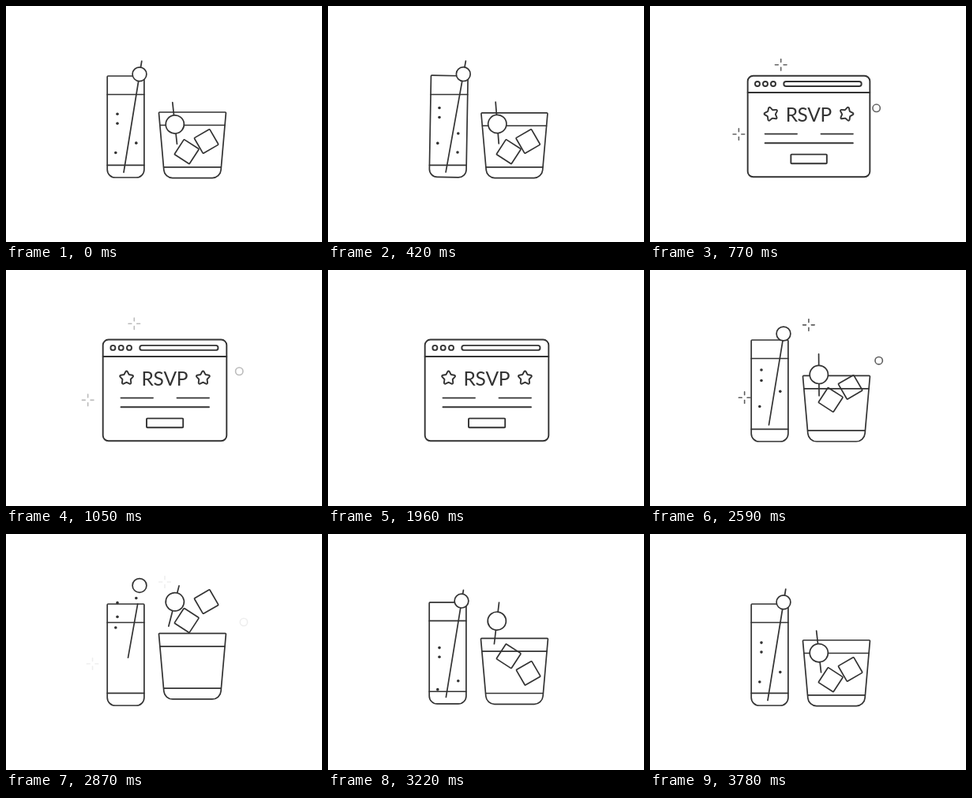
These frames come from a looping animation (400 by 300 pixels, 3.85 s). An HTML page with a canvas:

```html
<!DOCTYPE html>
<html>
<head>
<meta charset="utf-8">
<style>
html, body { margin: 0; width: 100%; height: 100%; overflow: hidden; background: #fff; }
canvas { display: block; width: 400px; height: 300px; }
</style>
</head>
<body>
<canvas></canvas>
<script>
const LOOP = 3850, STEP = 70, INK = '#333';
const OPEN = 630, STRETCH = 1960, POP = 2520, PEAK = 2940;
const canvas = document.querySelector('canvas');
const ctx = canvas.getContext('2d');
const ratio = window.devicePixelRatio || 1;
canvas.width = 400 * ratio;
canvas.height = 300 * ratio;

const mix = (a, b, u) => a + (b - a) * u;
const progress = (t, from, to) => Math.min(1, Math.max(0, (t - from) / (to - from)));

// Falls from 1 to 0, passes it once and comes to rest.
const settle = u => Math.exp(-(u ** 3)) * Math.cos(u * Math.PI / 2);
// Leaves 0 at POP, reaches 1 at PEAK, then drops back.
const toss = (t, fallTime) => t < PEAK
  ? Math.sin(progress(t, POP, PEAK) * Math.PI / 2)
  : settle((t - PEAK) / fallTime);
const hop = (t, from, to) => Math.sin(progress(t, from, to) * Math.PI) ** 2;

function line(x1, y1, x2, y2) {
  ctx.beginPath();
  ctx.moveTo(x1, y1);
  ctx.lineTo(x2, y2);
  ctx.stroke();
}

function circle(x, y, r, fill = 'transparent') {
  ctx.beginPath();
  ctx.arc(x, y, r, 0, Math.PI * 2);
  ctx.fillStyle = fill;
  ctx.fill();
  if (fill !== INK) ctx.stroke();
}

function box(x1, y1, x2, y2, r) {
  ctx.beginPath();
  ctx.roundRect(x1, y1, x2 - x1, y2 - y1, r);
  ctx.stroke();
}

// Closed outline of [x, y, cornerRadius] points.
function outline(points) {
  const n = points.length, a = points[n - 1], b = points[0];
  ctx.beginPath();
  ctx.moveTo((a[0] + b[0]) / 2, (a[1] + b[1]) / 2);
  points.forEach(([x, y, r], i) => {
    const next = points[(i + 1) % n];
    ctx.arcTo(x, y, next[0], next[1], r);
  });
  ctx.closePath();
  ctx.stroke();
}

function placed(x, y, degrees, draw, scale = 1) {
  ctx.save();
  ctx.translate(x, y);
  ctx.rotate(degrees * Math.PI / 180);
  ctx.scale(scale, scale);
  draw();
  ctx.restore();
}

function star(x, y, size, degrees) {
  placed(x, y, degrees, () => outline(Array.from({ length: 10 }, (_, i) => {
    const inner = i % 2, r = inner ? size * 0.53 : size, a = (i / 5 - 0.5) * Math.PI;
    return [r * Math.cos(a), r * Math.sin(a), inner ? 0.6 : 1.3];
  })));
}

function sparkle(x, y) {
  for (let i = 0; i < 4; i++) placed(x, y, i * 90, () => line(3.4, 0, 7.3, 0));
}

// Two sparkles and a ring fly outwards and fade.
function burst(t, from, duration, top, left, ring) {
  const rest = 1 - progress(t, from, from + duration);
  if (t < from || !rest) return;
  const spread = 1 - 0.2 * rest ** 3;
  const out = ([x, y]) => [mix(200, x, spread), mix(140, y, spread)];
  ctx.save();
  ctx.globalAlpha = rest ** 1.2;
  ctx.lineWidth = 1.6;
  sparkle(...out(top));
  sparkle(...out(left));
  circle(...out(ring), 4.7);
  ctx.restore();
}

function drawBrowser(t) {
  const entry = settle((t - OPEN) / 180);
  const wide = Math.sin(Math.PI * progress(t, STRETCH, POP) ** 1.5) - 0.2 * entry;
  const at = (rest, stretched) => mix(rest, stretched, wide);
  ctx.lineWidth = at(1.9, 1.7);

  const left = at(122.7, 99.8), right = at(279.3, 302.2);
  box(left, at(88.5, 83.5), right, 217.3, 7);
  line(left, 110, right, 110);
  const barY = at(98.9, 96.3);
  for (let i = 0; i < 3; i++) circle(156 - i * at(10.3, 17.2), barY, 3);
  box(169.3, barY - 3, at(268.5, 287), barY + 3, 3);

  const starGap = at(48.4, 67), starY = at(137.3, 136.5), size = at(10.2, 9.5);
  star(201 - starGap, starY, size, -72 * entry);
  star(201 + starGap, starY, size, 72 * entry);

  ctx.fillStyle = INK;
  ctx.font = '24.5px Lato, sans-serif';
  const gap = at(-0.3, 4.4);
  const letters = [...'RSVP'], widths = letters.map(c => ctx.measureText(c).width);
  let x = 200.9 - (widths.reduce((a, b) => a + b) + gap * 3) / 2;
  letters.forEach((c, i) => {
    ctx.fillText(c, x, at(146.8, 146.4));
    x += widths[i] + gap;
  });

  const textLeft = at(145.5, 142), textRight = at(257, 260);
  line(textLeft, 162.6, 186, 162.6);
  line(216.5, 162.6, textRight, 162.6);
  line(textLeft, 174.2, textRight, 174.2);
  const half = at(23.1, 31.8);
  box(201.1 - half, 188.6, 201.1 + half, 200.2, 1);
}

function drawTallGlass(t, lean) {
  const lift = 2.4 * hop(t, 2870, 3430);
  const level = height => {
    const shift = height * lean * Math.PI / 180;
    line(128.2 + shift, 218 - lift - height, 174.9 + shift, 218 - lift - height);
  };
  level(105.5);
  level(15.7);

  const rise = 22 * toss(t, 310);
  placed(174.9, 218, lean, () => {
    ctx.translate(-174.9, -218);
    const top = 89 - lift, bottom = 218 - lift;
    outline([[128.2, top, 1], [174.9, top, 1], [174.9, bottom, 10], [128.2, bottom, 10]]);
    line(171.8 - rise * 0.24, 70 + rise * 0.89, 149 + rise * 0.26, 211.5 - rise * 2.56);
    circle(169, 86.7 - rise, 8.9, '#fff');
  });

  const bubble = (x, base, height, drift) => {
    const y = base - height * toss(t, 230) - drift * progress(t, 3220, 4270) ** 2;
    if (y < 198) circle(x, y, 1.8, INK);
  };
  bubble(141, 141.5, 56, 12);
  bubble(141, 153.5, 50, 12);
  bubble(164.8, 181, 103, 19);
  bubble(138.8, 193.4, 77, 19);
  bubble(164, 205, 0, 19);
}

function drawShortGlass(t, lean) {
  placed(236, 218.6 - 9.3 * hop(t, POP, 3360), 0, () => {
    outline([[-42.6, -83.6, 1], [42.5, -83.6, 1], [35.2, 0, 11], [-35.3, 0, 11]]);
    line(-41, -67.1, 41, -67.1);
    line(-36.3, -13.8, 36.3, -13.8);
  }, 1 - lean * 0.011);

  const rise = 66 * toss(t, 540);
  placed(213.8 + lean * 0.5, 150 - rise, -6 + rise * 0.32 + lean * 1.6, () => {
    const above = 28 - rise * 0.11;
    line(0, -above, 0, 53 - above);
    circle(0, 0, 11.6, '#fff');
  });

  const cube = (x, y, angle) => placed(x, y, angle, () => box(-11.3, -11.3, 11.3, 11.3, 1));
  cube(228.7, 185.2 - 78 * toss(t, 425), 33);
  cube(253.6 - lean * 0.4, 172 - 89 * toss(t, 230), -30);
}

function draw(t) {
  ctx.setTransform(ratio, 0, 0, ratio, 0, 0);
  ctx.fillStyle = '#fff';
  ctx.fillRect(0, 0, 400, 300);
  ctx.strokeStyle = INK;
  ctx.lineCap = ctx.lineJoin = 'round';

  burst(t, OPEN, 700, [161.8, 67.3], [102.4, 165.7], [296.5, 128.6]);
  burst(t, POP, 400, [201, 61], [109.5, 165], [301, 112]);
  if (t >= OPEN && t < POP) {
    drawBrowser(t);
  } else {
    // The drinks scene runs across the loop point.
    const sceneTime = t < OPEN ? t + LOOP : t;
    const lean = Math.max(0, (sceneTime - LOOP) / 420) ** 2;
    ctx.lineWidth = 1.7;
    drawTallGlass(sceneTime, lean);
    drawShortGlass(sceneTime, lean);
  }
}

const start = performance.now();
function tick() {
  const t = (performance.now() - start) % LOOP;
  draw(Math.floor(t / STEP) * STEP);
  requestAnimationFrame(tick);
}
tick();
</script>
</body>
</html>
```
